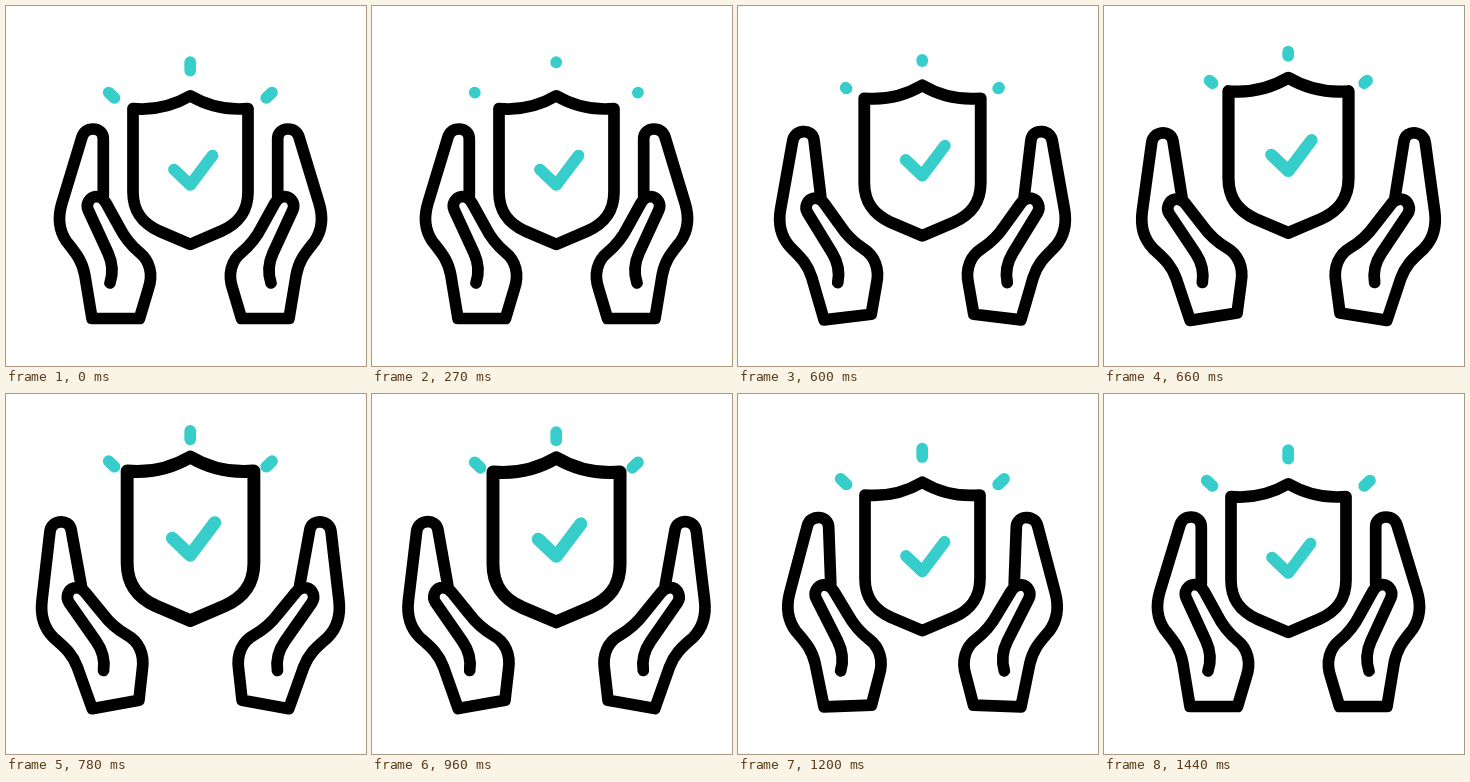
An HTML page that plays this animation: 360 px wide and 360 px high, repeating every 1500 ms.

```html
<!DOCTYPE html>
<html lang="en">
<head>
<meta charset="utf-8">
<title>Shield and hands</title>
<style>
  html, body { margin: 0; width: 100%; height: 100%; overflow: hidden; background: #fff; }
  svg { display: block; width: 100vw; height: 100vh; }
  path, line { fill: none; stroke: #000; stroke-width: 11.7; stroke-linecap: round; stroke-linejoin: round; }
  .teal { stroke: #37cdcb; }
</style>
</head>
<body>
<svg viewBox="0 0 360 360">
  <defs>
    <path id="hand" d="M97.300 190V133C97.300 127 93 123 87 123C81.500 123 77.500 126 76 131L56 197
      C52 210 52 223 60.500 235.500C69.500 247 76 254 78.800 269L86 312.500H133.500L142.300 283
      C147.500 268 143.500 254.500 133.500 246.500C124.500 239 118 230.500 113 220.500L100.300 197.500
      C98 193 94 190.500 90 190.500C83.500 191 79.500 198 82.200 204L102 247C107 258 107 268 104 277"/>
  </defs>
  <g id="left"><use href="#hand"/></g>
  <g transform="translate(369 0) scale(-1 1)"><g id="right"><use href="#hand"/></g></g>
  <g id="shield">
    <path d="M184.300 89.800C167 100 148 104.500 127 102.600V186C127 207 138 218 153 225L184.300 238.300
      L215.500 225C231 218 242 207 242 186V102.600C220.500 104.500 201.500 100 184.300 89.800Z"/>
    <path class="teal" d="M168 163.500L184.300 179L206.500 149.500"/>
  </g>
  <g id="rays">
    <line class="teal"/><line class="teal"/><line class="teal"/>
  </g>
</svg>
<script>
const LOOP = 1500;
const $ = id => document.getElementById(id);
const lines = [...document.querySelectorAll('#rays line')];
// outer x, y then inner x, y
const rays = [[184.2, 56.2, 184.2, 64.6], [102.7, 86.5, 108.5, 92], [266, 86.5, 260.2, 92]];

const clamp = v => Math.min(1, Math.max(0, v));
const span = (t, a, b) => clamp((t - a) / (b - a));
const sine = p => (1 - Math.cos(Math.PI * p)) / 2;
const mix = (a, b, k) => a + (b - a) * k;

// cubic-bezier(.25, 0, .4, 1), solved by bisection
function settle(p) {
  let lo = 0, hi = 1, s = 0.5;
  for (let i = 0; i < 20; i++) {
    s = (lo + hi) / 2;
    const x = 0.75 * (1 - s) ** 2 * s + 1.2 * (1 - s) * s * s + s ** 3;
    if (x < p) lo = s; else hi = s;
  }
  return s * s * (3 - 2 * s);
}

function draw(t) {
  const open = sine(span(t, 390, 740)) - settle(span(t, 930, 1400));
  const lift = sine(span(t, 435, 770)) - settle(span(t, 920, 1310));
  const grow = sine(span(t, 540, 810)) - sine(span(t, 960, 1170));

  const turn = `rotate(${-10.3 * open} 98 312.5)`;
  $('left').setAttribute('transform', turn);
  $('right').setAttribute('transform', turn);

  const y = -19.3 * lift;
  $('shield').setAttribute('transform',
    `translate(184.3 ${164 + y}) scale(${1 + 0.105 * grow}) translate(-184.3 -164)`);

  // rays trim away outwards, then grow back from the inner end
  const leaving = t < 420;
  const from = leaving ? 0 : 1 - sine(span(t, 540, 780));
  const to = leaving ? 1 - sine(span(t, 0, 300)) : 1;
  const shown = t < 300 || t > 555;
  $('rays').setAttribute('transform', `translate(0 ${y})`);
  $('rays').setAttribute('visibility', shown ? 'visible' : 'hidden');
  rays.forEach(([ox, oy, ix, iy], i) => {
    const ends = { x1: mix(ox, ix, from), y1: mix(oy, iy, from), x2: mix(ox, ix, to), y2: mix(oy, iy, to) };
    for (const k in ends) lines[i].setAttribute(k, ends[k]);
  });
}

const start = performance.now();
function tick() {
  draw((performance.now() - start) % LOOP);
  requestAnimationFrame(tick);
}
tick();
</script>
</body>
</html>
```
